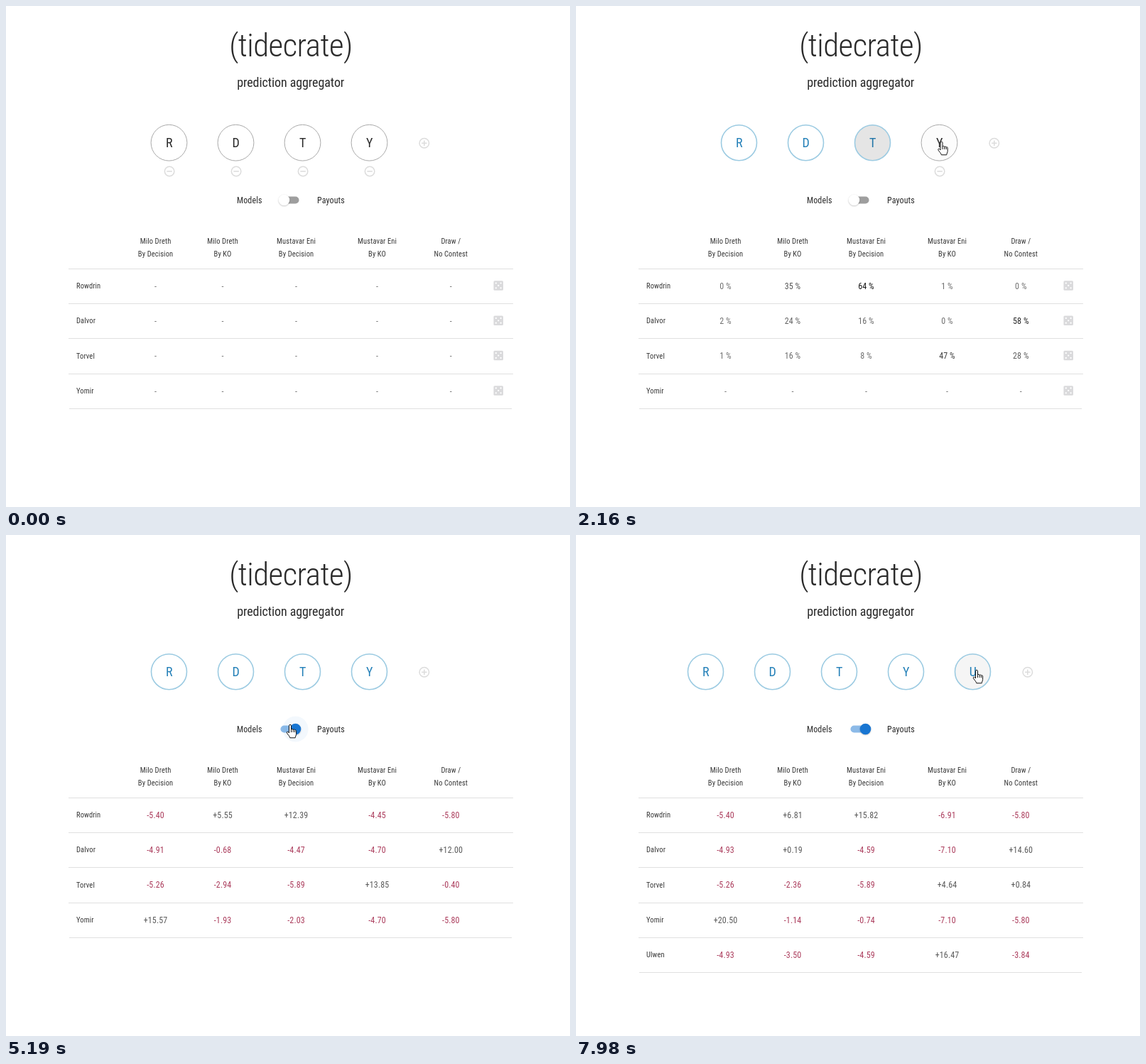
An HTML page with a canvas that plays this animation: 794 px wide and 706 px high, repeating every 8 s.

```html
<!DOCTYPE html>
<html lang="en">
<head>
<meta charset="utf-8">
<title>prediction aggregator</title>
<style>
html, body { margin: 0; width: 100%; height: 100%; overflow: hidden; background: #fff; }
canvas { display: block; }
</style>
</head>
<body>
<canvas id="stage" width="794" height="706"></canvas>
<script>
const ctx = document.getElementById('stage').getContext('2d');
const LOOP = 8000, PRESS = 80, TAU = Math.PI * 2;
const FAMILY = '"Roboto Condensed", Roboto, "Liberation Sans", sans-serif';
const INK = '#2a2a2a', SOFT_INK = '#383838';
const BUTTON_Y = 192.7, TOGGLE_Y = 273.5;

// A draw takes what the four win odds leave over
const person = (name, click, ...odds) =>
  ({ name, click, odds: [...odds, 100 - odds.reduce((a, b) => a + b)] });

const people = [
  person('Rowdrin', 940, 0, 35, 64, 1),
  person('Dalvor', 1335, 2, 24, 16, 0),
  person('Torvel', 1780, 1, 16, 8, 47),
  person('Yomir', 2330, 54, 22, 24, 0),
  person('Ulwen', 7200, 2, 0, 16, 71)
];
const toggleClick = 3950, addClick = 5780;

const columnX = [210.5, 305, 408.5, 522.5, 626.3];
const titles = ['Milo Dreth', 'Mustavar Eni']
  .flatMap(name => [[name, 'By Decision'], [name, 'By KO']])
  .concat([['Draw /', 'No Contest']]);

// Pointer moves: leave at, arrive at, x, y
const entry = { x: 710, y: 56 };
const moves = [
  [480, 890, 227, 186], [1080, 1300, 317, 188], [1370, 1720, 413, 190],
  [1940, 2170, 515, 192], [3230, 3660, 400, 268], [5250, 5650, 588, 190],
  [5950, 6350, 564, 191]
];

const handPath = new Path2D('M-1.5 11V.8a1.5 1.5 0 0 1 3 0V6.5c.2-1.6 2.6-1.4 2.7.3 .3-1.3 2.3-1.1 2.4.5 .4-1 2-.7 2 .8v4.5c0 2-1.2 2.6-1.4 5.2h-7.4c-.3-2.2-2.6-4-4.3-6.7-.9-1.6.9-2.8 2.2-1.2z');
const knuckles = new Path2D('M1.5 6.5v3.5M4.2 7v3M6.6 7.5v2.5');
const arrowPath = new Path2D('M0 0V13l3-2.8 2 4.6 2.2-.9-2-4.5h4z');

const clamp = v => Math.max(0, Math.min(1, v));
const smooth = v => { v = clamp(v); return v * v * (3 - 2 * v); };
const cents = v => Math.round(v * 100) / 100;

// Everyone stakes the top odds; each keeps their own share of it
// and the rest goes, by odds, to those who rated the outcome higher.
function settle(col, count) {
  const odds = people.slice(0, count).map(p => p.odds[col] / 100);
  const stake = 10 * Math.max(...odds);
  const net = odds.map(() => 0);
  odds.forEach((own, i) => {
    const total = odds.reduce((sum, p) => sum + (p > own ? p : 0), 0);
    if (!total) return;
    const lost = stake - cents(stake * own);
    net[i] -= lost;
    odds.forEach((p, j) => {
      if (p > own) net[j] += cents(lost * p / total);
    });
  });
  return net;
}

const fontOf = (size, weight = 400) => `${weight} condensed ${size}px ${FAMILY}`;

// Narrow the regular face only where no condensed one exists
ctx.font = fontOf(18);
const narrow = ctx.measureText('prediction aggregator').width > 157 ? 0.868 : 1;

function text(str, x, y, size, color, { align = 'center', weight = 400, spacing = 0.01 } = {}) {
  ctx.save();
  ctx.translate(x, y);
  ctx.scale(narrow, 1);
  ctx.font = fontOf(size, weight);
  ctx.letterSpacing = `${size * spacing}px`;
  ctx.textAlign = align;
  ctx.fillStyle = color;
  ctx.fillText(str, 0, 0);
  ctx.restore();
}

function disc(x, y, r, color) {
  ctx.beginPath();
  ctx.arc(x, y, r, 0, TAU);
  ctx.fillStyle = color;
  ctx.fill();
}

function ring(x, y, r, width, color) {
  ctx.beginPath();
  ctx.arc(x, y, r, 0, TAU);
  ctx.lineWidth = width;
  ctx.strokeStyle = color;
  ctx.stroke();
}

function pill(x, y, w, h, r, color) {
  ctx.beginPath();
  ctx.roundRect(x, y, w, h, r);
  ctx.fillStyle = color;
  ctx.fill();
}

function pointer(t) {
  if (t < moves[0][0]) return null;
  let { x, y } = entry;
  for (const [leave, arrive, toX, toY] of moves) {
    const k = smooth((t - leave) / (arrive - leave));
    x += (toX - x) * k;
    y += (toY - y) * k;
  }
  return { x, y };
}

function isOver(p, x, y, r) {
  return !!p && Math.hypot(p.x - x, p.y - y) < r;
}

// Share of the last 250 ms spent inside a round target
function hover(t, x, y, r) {
  let n = 0;
  for (let i = 0; i < 25; i++) n += isOver(pointer(t - i * 10), x, y, r);
  return n / 25;
}

function ripple(t, down, x, y, r) {
  const age = t - down;
  if (age < 0 || age > PRESS + 550) return;
  const at = pointer(down);
  const reach = Math.hypot(r + Math.abs(at.x - x), r + Math.abs(at.y - y));
  const grow = smooth(clamp(age / 550) ** 0.75);
  const alpha = (0.08 + 0.14 * grow) * (1 - smooth((age - PRESS) / 550));
  ctx.save();
  ctx.beginPath();
  ctx.arc(x, y, r, 0, TAU);
  ctx.clip();
  disc(at.x, at.y, reach * grow, `rgba(0,0,0,${alpha})`);
  ctx.restore();
}

function signIcon(x, y, plus) {
  ring(x, y, 6.75, 1.5, '#dcdcdc');
  ctx.fillStyle = '#dcdcdc';
  ctx.fillRect(x - 3.75, y - 0.75, 7.5, 1.5);
  if (plus) ctx.fillRect(x - 0.75, y - 3.75, 1.5, 7.5);
}

function dice(x, y) {
  pill(x - 6.75, y - 6.75, 13.5, 13.5, 1.5, '#dadadc');
  disc(x, y, 1.15, '#fff');
  for (const dx of [-3.4, 3.4]) {
    for (const dy of [-3.4, 3.4]) disc(x + dx, y + dy, 1.15, '#fff');
  }
}

const isSet = (p, t) => t >= p.click + PRESS;

function personButton(t, p, x) {
  const on = isSet(p, t);
  disc(x, BUTTON_Y, 25.5, `rgba(0,0,0,${0.04 * hover(t, x, BUTTON_Y, 26)})`);
  text(p.name[0], x + 0.3, 199.3, 18, on ? '#2480b8' : INK);
  ripple(t, p.click, x, BUTTON_Y, 25);
  ring(x, BUTTON_Y, on ? 25 : 25.4, on ? 1.6 : 1, on ? '#9ccbe2' : '#a9a9a9');
  if (!on) signIcon(x + 0.6, 233, false);
}

function toggle(t) {
  const k = smooth((t - toggleClick - PRESS) / 150);
  const x = 391.5 + 16 * k, on = k > 0.5;
  text('Models', 325, 277.5, 12, INK, { align: 'left' });
  text('Payouts', 438, 277.5, 12, INK, { align: 'left' });
  pill(386.5, TOGGLE_Y - 5, 26, 10, 5, on ? '#8cbae8' : '#9e9e9e');
  const glow = 0.05 * hover(t, 399.5, TOGGLE_Y, 16);
  disc(x, TOGGLE_Y, 18, on ? `rgba(25,118,210,${glow})` : `rgba(0,0,0,${glow})`);
  ctx.save();
  ctx.shadowColor = 'rgba(0,0,0,.25)';
  ctx.shadowBlur = 2;
  ctx.shadowOffsetY = 0.7;
  disc(x, TOGGLE_Y, 7.8, on ? '#1976d2' : '#fff');
  ctx.restore();
}

// Likelier outcomes are darker
function shade(percent) {
  const v = Math.round(112 - 0.023 * percent ** 2);
  return `rgb(${v},${v},${v})`;
}

function table(t, rows) {
  const paid = t >= toggleClick + PRESS;
  const settled = people.filter(p => isSet(p, t)).length;
  const lineY = i => Math.floor(370 + 49.35 * i);
  const rowY = i => 394.3 + 49.3 * i;

  ctx.fillStyle = '#e0e0e0';
  for (let i = 0; i < rows; i++) ctx.fillRect(88, lineY(i), 626, 1);
  ctx.fillRect(89, lineY(rows), 623, 1);

  people.slice(0, rows).forEach((p, i) => {
    text(p.name, 99, rowY(i) + 3.7, 10.5, SOFT_INK, { align: 'left' });
    if (!paid) dice(693.2, rowY(i) - 0.3);
  });

  columnX.forEach((x, col) => {
    titles[col].forEach((line, i) => text(line, x, 335 + 18 * i, 10.5, SOFT_INK));
    const net = paid && settle(col, settled);
    for (let i = 0; i < rows; i++) {
      let label = '-', color = '#777';
      if (i < settled && paid) {
        label = (net[i] > 0 ? '+' : '') + net[i].toFixed(2);
        color = net[i] > 0 ? '#5a5a5a' : '#ab3c5c';
      } else if (i < settled) {
        const odds = people[i].odds[col];
        label = `${odds} %`;
        color = shade(odds);
      }
      text(label, x, rowY(i) + 4.4, 12, color);
    }
  });
}

function drawPointer(p, hand) {
  ctx.save();
  ctx.translate(p.x, p.y);
  ctx.lineWidth = 1;
  ctx.lineJoin = 'round';
  ctx.strokeStyle = '#111';
  ctx.fillStyle = '#fff';
  const shape = hand ? handPath : arrowPath;
  ctx.fill(shape);
  ctx.stroke(shape);
  if (hand) ctx.stroke(knuckles);
  ctx.restore();
}

function draw(t) {
  ctx.fillStyle = '#fff';
  ctx.fillRect(0, 0, 794, 706);
  text('(tidecrate)', 401, 70.5, 45, INK, { weight: 300, spacing: -0.012 });
  text('prediction aggregator', 400.7, 114, 18, INK, { spacing: -0.004 });

  const count = t < addClick + PRESS ? 4 : 5;
  const buttonX = i => 370.5 + 94 * (i - (count - 1) / 2);
  const plusX = buttonX(count) - 16.7;
  const shown = people.slice(0, count);
  shown.forEach((p, i) => personButton(t, p, buttonX(i)));
  signIcon(plusX, 193.3, true);
  toggle(t);
  table(t, count);

  const p = pointer(t);
  if (!p) return;
  const hand = shown.some((_, i) => isOver(p, buttonX(i), BUTTON_Y, 26)) ||
    isOver(p, plusX, 193.3, 13) || isOver(p, 399.5, TOGGLE_Y, 16);
  drawPointer(p, hand);
}

function tick() {
  draw(performance.now() % LOOP);
  requestAnimationFrame(tick);
}
tick();
</script>
</body>
</html>
```
